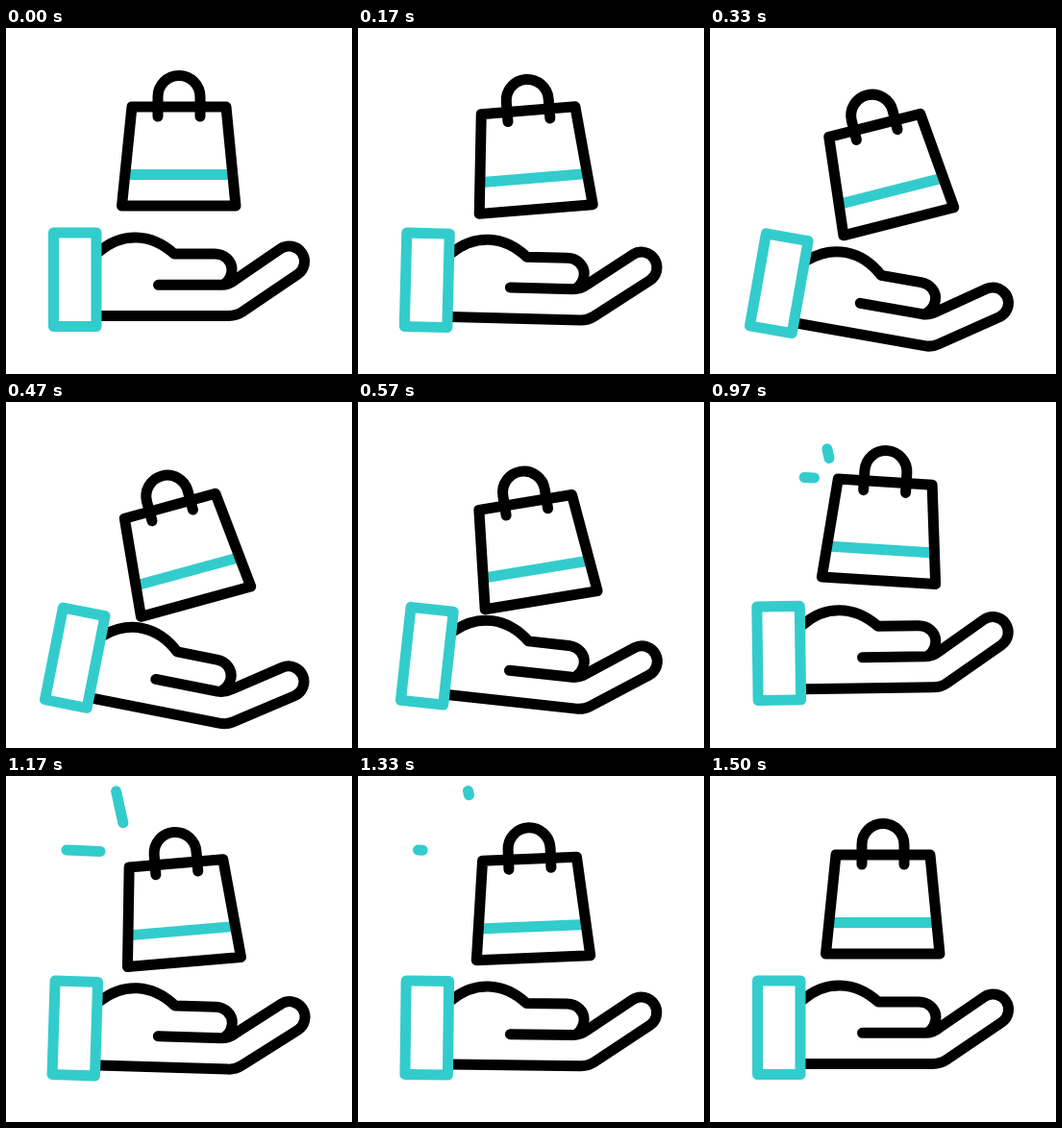
Recreate the animation shown at these times as an HTML page. Size 360x360 px, loop 2 s.

```html
<!DOCTYPE html>
<html lang="en">
<head>
<meta charset="utf-8">
<title>Shopping bag over hand</title>
<style>
  html, body { margin: 0; width: 100%; height: 100%; overflow: hidden; background: #fff; }
  svg { display: block; width: 100vw; height: 100vh; }
  .ink, .teal { fill: none; stroke: #000; stroke-width: 11; stroke-linecap: round; stroke-linejoin: round; }
  .teal { stroke: #33cccc; }
</style>
</head>
<body>
<svg viewBox="0 0 360 360">
  <g id="hand">
    <path class="ink" d="M97 232.500C120 213 150 212.500 175 235H217C228 235 235 243 235 251Q235 260 228 266"/>
    <path class="ink" d="M158.500 267.300H224Q232 267 238 262.300L285.500 229.700A16 16 0 0 1 303.500 256.300L246 295.300Q240 299.400 232 299.400H97"/>
    <path class="teal" style="fill:#fff" d="M49.500 213H94V310.500H49.500Z"/>
  </g>
  <g id="bag">
    <path class="teal" style="stroke-linecap:butt" d="M124 152.500H236"/>
    <path class="ink" d="M131 82H229L239 185H120.500Z"/>
    <path class="ink" d="M158 92V71.500A22 22 0 0 1 202 71.500V92"/>
  </g>
  <line id="sparkA" class="teal"/>
  <line id="sparkB" class="teal"/>
</svg>
<script>
const LOOP = 2000;
const el = id => document.getElementById(id);

// Tracks are [time in ms, value] pairs with sine easing between them.
const handTurn = [[100, 0], [415, 12], [815, -5.4], [1085, 2], [1500, 0]];
const bagTurn = [[30, 0], [420, -16.2], [845, 8.3], [1155, -4.9], [1500, 0]];
const bagDrop = [[70, 0], [470, 25], [920, 0], [1155, 8.8], [1500, 0]];
const sparkHead = [[870, 0], [1190, 1]];
const sparkTail = [[1065, 0], [1400, 1]];

const sparks = [
  { node: el('sparkA'), from: [124, 58.5], to: [114.5, 15.5] },
  { node: el('sparkB'), from: [108.5, 79], to: [62.5, 77] }
];

const mix = (a, b, k) => a + (b - a) * k;

function sample(track, t) {
  if (t <= track[0][0]) return track[0][1];
  for (let i = 1; i < track.length; i++) {
    const [t0, a] = track[i - 1], [t1, b] = track[i];
    if (t < t1) return mix(a, b, (1 - Math.cos(Math.PI * (t - t0) / (t1 - t0))) / 2);
  }
  return track[track.length - 1][1];
}

function drawSpark({ node, from, to }, head, tail) {
  node.style.display = head - tail > 0.01 ? '' : 'none';
  ['x', 'y'].forEach((axis, i) => {
    node.setAttribute(axis + 1, mix(from[i], to[i], tail));
    node.setAttribute(axis + 2, mix(from[i], to[i], head));
  });
}

function draw(t) {
  el('hand').setAttribute('transform', `rotate(${sample(handTurn, t)} 49 264)`);
  el('bag').setAttribute('transform',
    `translate(0 ${sample(bagDrop, t)}) rotate(${sample(bagTurn, t)} 180 117.5)`);
  const head = sample(sparkHead, t), tail = sample(sparkTail, t);
  sparks.forEach(s => drawSpark(s, head, tail));
}

const start = performance.now();
function tick(now) {
  draw(Math.max(0, now - start) % LOOP);
  requestAnimationFrame(tick);
}
draw(0);
requestAnimationFrame(tick);
</script>
</body>
</html>
```
